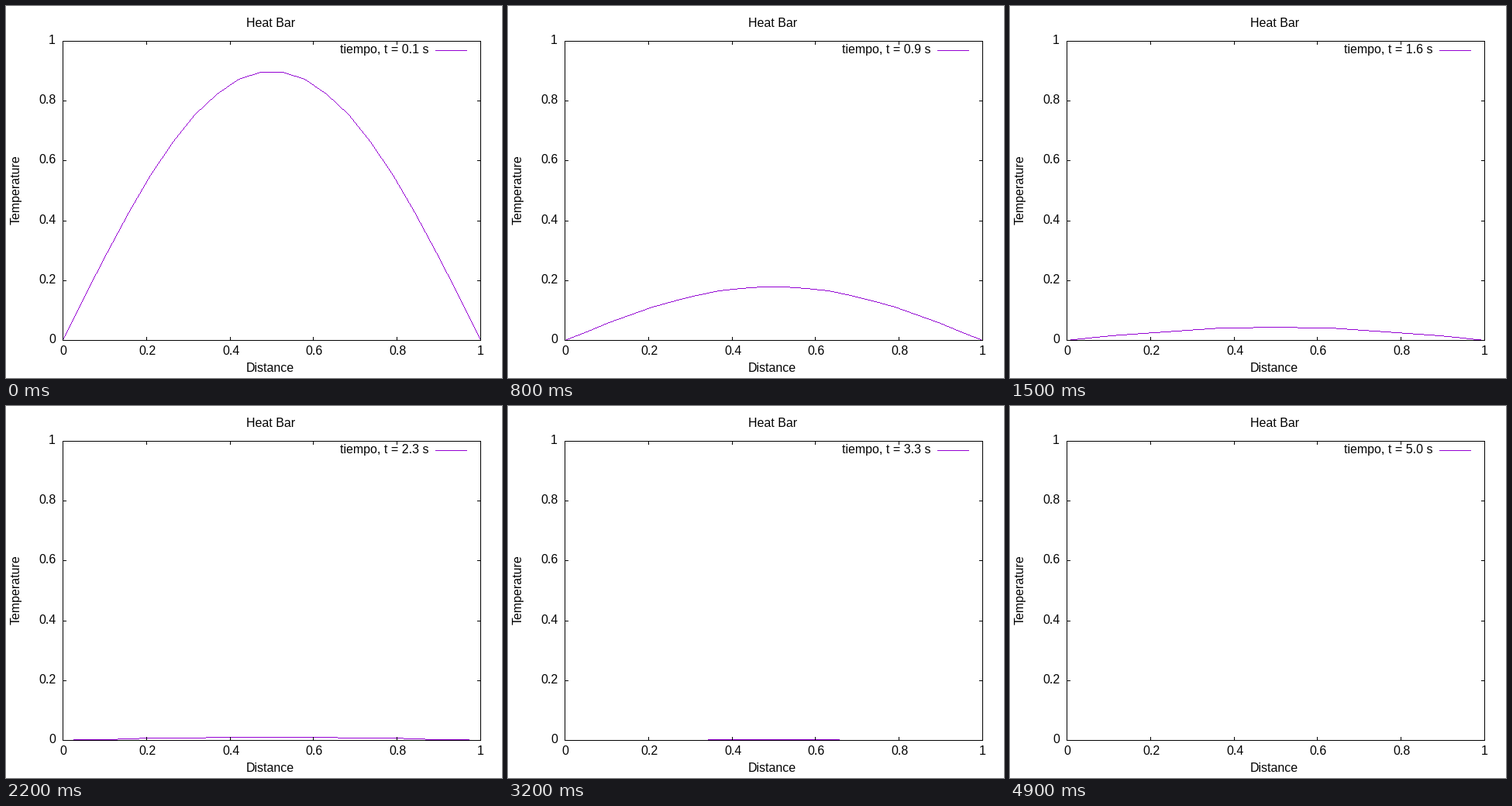
Write a matplotlib script that moves like this. It is 640x480 px and loops after 5000 ms.

```python
import numpy as np
import matplotlib.pyplot as plt
from matplotlib.animation import FuncAnimation
from matplotlib.collections import PolyCollection
from matplotlib.patches import Rectangle

WIDTH, HEIGHT, DPI = 640, 480, 100
LEFT, RIGHT, TOP, BOTTOM = 73, 612, 45, 431
TICK = 5
NODES = 20
FRAMES, INTERVAL = 50, 100
PURPLE = "#9400d3"

plt.rcParams.update({
    "font.family": "Liberation Sans",
    "font.size": 16 * 72 / DPI,
    "text.hinting": "default",
    "toolbar": "None",
})

fig = plt.figure(figsize=(WIDTH / DPI, HEIGHT / DPI), dpi=DPI, facecolor="white")
ax = fig.add_axes([0, 0, 1, 1])
ax.set(xlim=(0, WIDTH), ylim=(HEIGHT, 0))
ax.axis("off")


def bar(x, y, w, h, color="black"):
    ax.add_patch(Rectangle((x, y), w, h, color=color, lw=0,
                           antialiased=False, zorder=3))


def label(x, baseline, text, **kwargs):
    return ax.text(x, baseline, text, ha="left", va="baseline", zorder=4, **kwargs)


def to_pixel(value):
    return np.floor(np.asarray(value) + 0.5).astype(int)


def line_pixels(x0, y0, x1, y1):
    """One-pixel-wide line, stepping along its longer axis."""
    if abs(y1 - y0) > abs(x1 - x0) and y0 > y1:
        x0, y0, x1, y1 = x1, y1, x0, y0
    dx, dy = x1 - x0, y1 - y0
    n = max(abs(dx), abs(dy))
    i = np.arange(n + 1)

    def advance(d):
        return np.sign(d) * ((2 * i * abs(d) + n) // (2 * n))

    return np.column_stack([x0 + advance(dx), y0 + advance(dy)])


def draw_frame_and_labels():
    for x in (LEFT, RIGHT):
        bar(x, TOP, 1, BOTTOM - TOP + 1)
    for y in (TOP, BOTTOM):
        bar(LEFT, y, RIGHT - LEFT + 1, 1)

    for k in range(6):
        value = k / 5
        text = f"{value:g}"
        whole = len(text) == 1
        x = int(to_pixel(LEFT + value * (RIGHT - LEFT)))
        y = BOTTOM - int(to_pixel(value * (BOTTOM - TOP)))
        bar(x, TOP, 1, TICK)
        bar(x, BOTTOM - TICK + 1, 1, TICK)
        bar(LEFT, y, TICK, 1)
        bar(RIGHT - TICK + 1, y, TICK, 1)
        label(x - (4 if whole else 10), 450, text)
        label(55 if whole else 42, y + 4, text)

    label(310, 27, "Heat Bar")
    label(310, 472, "Distance")
    label(18, 282, "Temperature", rotation=90, rotation_mode="anchor")
    bar(554, 57, 41, 1, PURPLE)


draw_frame_and_labels()
legend = label(431, 61, "")
curve = PolyCollection([], facecolors=PURPLE, edgecolors="none", linewidths=0,
                       antialiaseds=False, zorder=2)
ax.add_collection(curve, autolim=False)

position = np.linspace(0, 1, NODES)
node_x = to_pixel(LEFT + position * (RIGHT - LEFT))
unit_square = np.array([[0, 0], [1, 0], [1, 1], [0, 1]])


def update(frame):
    t = (frame + 1) / 10
    heat = 0.9 * np.exp(-2.012 * (t - 0.1)) * np.sin(np.pi * position)
    node_y = BOTTOM - to_pixel(heat * (BOTTOM - TOP))
    nodes = list(zip(node_x.tolist(), node_y.tolist()))
    pixels = np.vstack([line_pixels(*a, *b) for a, b in zip(nodes, nodes[1:])])
    curve.set_verts(pixels[:, None, :] + unit_square)
    legend.set_text(f"tiempo, t = {t:.1f} s")
    return curve, legend


animation = FuncAnimation(fig, update, frames=FRAMES, interval=INTERVAL,
                          repeat=True, repeat_delay=0, blit=False)
plt.show()
```
